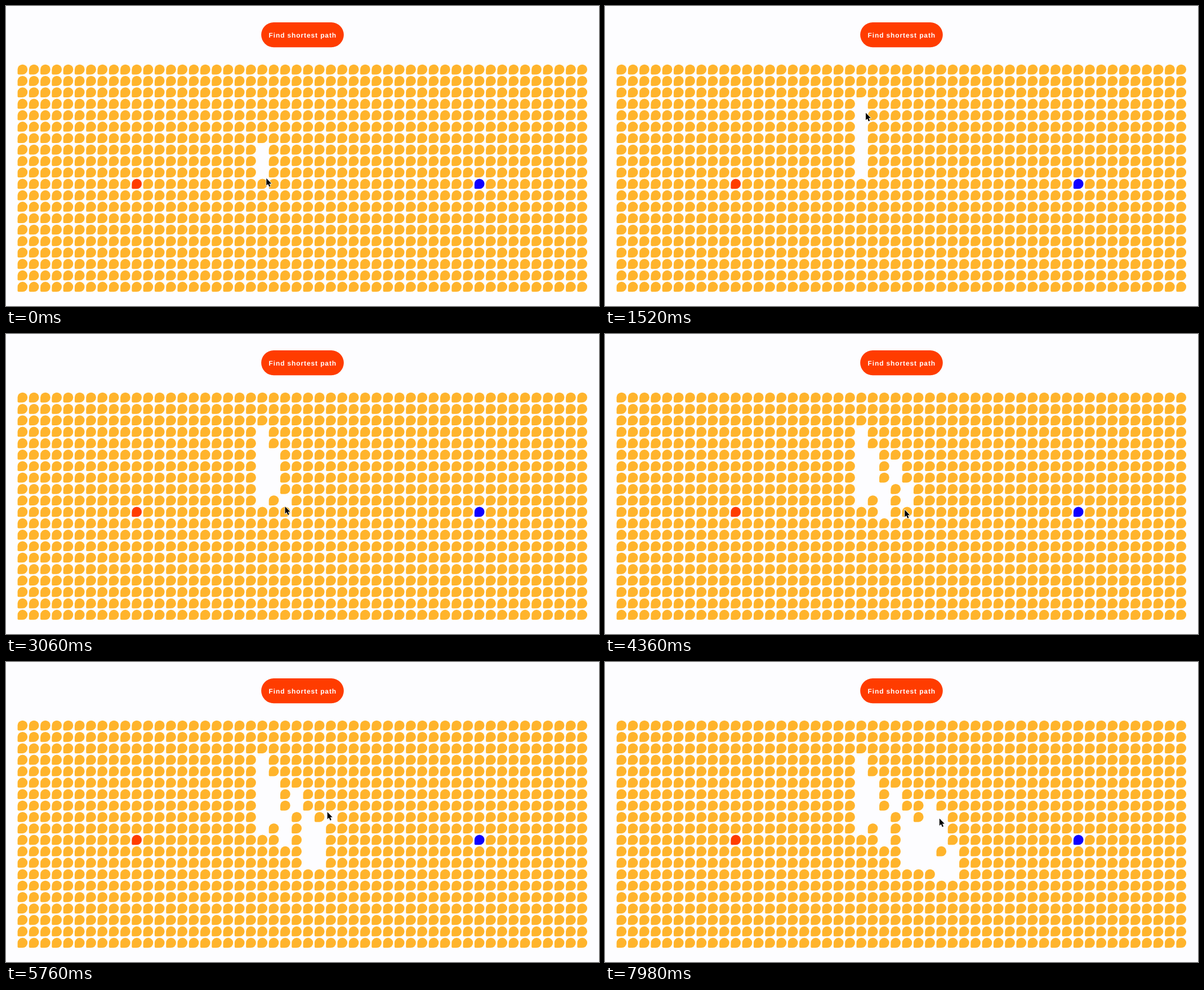
Animation of 1053 by 532 pixels, one loop 8000 ms. Source, as an HTML page:

```html
<!DOCTYPE html>
<html lang="en">
<head>
<meta charset="utf-8">
<title>Find shortest path</title>
<style>
html, body { margin: 0; width: 100%; height: 100%; overflow: hidden; background: #fdfdff; }
svg { display: block; width: 1053px; height: 532px; }
text {
  font: bold 12px "Liberation Sans", Arial, sans-serif;
  letter-spacing: .88px;
  text-rendering: geometricPrecision;
  fill: #fff;
}
#cells { fill: #ffb42c; }
#cursor { stroke: #fff; stroke-width: 1.6; stroke-linejoin: round; paint-order: stroke; }
</style>
</head>
<body>
<svg viewBox="0 0 1053 532">
  <defs>
    <path id="drop" d="M0 8.85A8.85 8.85 0 1 1 8.85 17.7H1.8Q0 17.7 0 15.9Z"/>
  </defs>
  <rect x="453.2" y="29" width="146.6" height="44.2" rx="22.1" fill="#ff3c00"/>
  <text x="466.5" y="56">Find shortest path</text>
  <g id="cells"></g>
  <path id="cursor" d="M-.6-.3V12.4L2.3 9.8 4.4 14.7 6.6 13.7 4.5 9H8.4Z"/>
</svg>
<script>
const LOOP = 8000, COLS = 50, ROWS = 20;
const PITCH = 20.283, SIZE = 17.7, LEFT = 20.55, TOP = 103.7;
const LAG = 60; // the grid reacts a little after the pointer

// turning points of the pointer: time, x, y; the first stroke begins before the loop
const turns = [
  [-900, 460, 247], [0, 463, 306], [1250, 458.5, 168], [2700, 486, 285],
  [3040, 495.5, 309], [3640, 514.2, 232], [3910, 526.6, 264.7], [4730, 538, 351],
  [5160, 553, 349], [5640, 567, 285], [5840, 574, 254], [6560, 575, 345],
  [7000, 613, 376], [7300, 607.7, 325.4], [7700, 594, 275], [LOOP, 594.5, 278]
];

function pointer(t) {
  const next = turns.findIndex(turn => turn[0] > t);
  const [t0, x0, y0] = turns[next - 1], [t1, x1, y1] = turns[next];
  const k = (t - t0) / (t1 - t0);
  return [x0 + (x1 - x0) * k, y0 + (y1 - y0) * k];
}

const group = document.getElementById("cells");
const cursor = document.getElementById("cursor");
const grid = [];

for (let row = 0; row < ROWS; row++) {
  for (let col = 0; col < COLS; col++) {
    const cell = document.createElementNS("http://www.w3.org/2000/svg", "use");
    cell.setAttribute("href", "#drop");
    cell.setAttribute("x", LEFT + col * PITCH);
    cell.setAttribute("y", TOP + row * PITCH);
    group.append(cell);
    grid.push(cell);
  }
}
const cellAt = (col, row) => grid[row * COLS + col];
cellAt(10, 10).setAttribute("fill", "#ff3c00");
cellAt(40, 10).setAttribute("fill", "#1000ff");

function cellUnder(x, y) {
  const dx = x - LEFT, dy = y - TOP;
  const inside = dx % PITCH < SIZE && dy % PITCH < SIZE;
  return inside ? cellAt(Math.floor(dx / PITCH), Math.floor(dy / PITCH)) : null;
}

// every cell the pointer crosses becomes a wall
const walls = new Map();
for (let t = turns[0][0]; t < LOOP; t += 5) {
  const cell = cellUnder(...pointer(t));
  if (cell && !walls.has(cell)) walls.set(cell, t + LAG);
}

function draw(t) {
  for (const [cell, time] of walls) cell.style.display = t >= time ? "none" : "";
  cursor.setAttribute("transform", `translate(${pointer(t)})`);
}

const begin = performance.now();
function frame() {
  draw((performance.now() - begin) % LOOP);
  requestAnimationFrame(frame);
}
frame();
</script>
</body>
</html>
```
